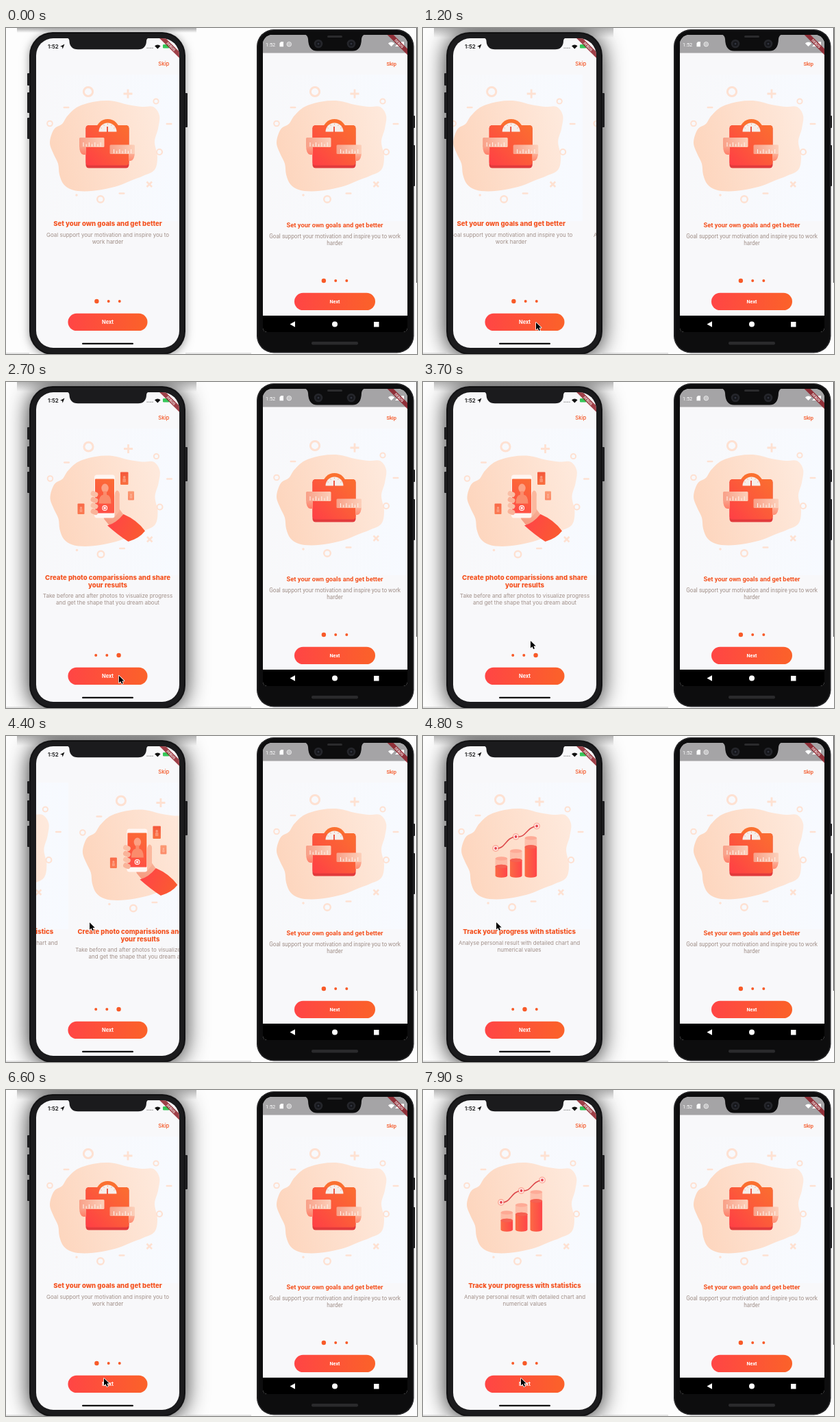
An HTML page with a canvas that plays this animation: 600x476 px, repeating every 8 s.

```html
<!DOCTYPE html>
<html lang="en">
<head>
<meta charset="utf-8">
<title>Onboarding on two phones</title>
<style>
html, body { margin: 0; width: 100%; height: 100%; overflow: hidden; background: #fdfdfd; }
canvas { display: block; width: 600px; height: 476px; }
</style>
</head>
<body>
<canvas id="stage"></canvas>
<script>
const W = 600, H = 476, LOOP = 8000, PAGE = 209;
const canvas = document.getElementById('stage');
const ctx = canvas.getContext('2d');
const dpr = window.devicePixelRatio || 1;
canvas.width = W * dpr;
canvas.height = H * dpr;

const IOS = 'Inter, "Open Sans", sans-serif';
const DROID = 'Roboto, "Noto Sans", sans-serif';
const ORANGE = '#f4511e', GREY = '#a08f88', DECO = '#fee1d2';

const PAGES = [
  { title: ['Set your own goals and get better'],
    body: ['Goal support your motivation and inspire you to', 'work harder'], art: drawScale },
  { title: ['Track your progress with statistics'],
    body: ['Analyse personal result with detailed chart and', 'numerical values'], art: drawChart },
  { title: ['Create photo comparissions and share', 'your results'],
    body: ['Take before and after photos to visualize progress', 'and get the shape that you dream about'],
    art: drawHand, dx: 0.5, dy: 1.5 }
];

// ---- motion ----
function bezier(x1, y1, x2, y2) {
  const f = (a, b, u) => 3 * a * u * (1 - u) ** 2 + 3 * b * u * u * (1 - u) + u ** 3;
  return x => {
    let lo = 0, hi = 1;
    for (let i = 0; i < 24; i++) {
      const mid = (lo + hi) / 2;
      if (f(x1, x2, mid) < x) lo = mid; else hi = mid;
    }
    return f(y1, y2, (lo + hi) / 2);
  };
}
const ease = bezier(0.25, 0.1, 0.25, 1);
const easeInOut = x => x * x * (3 - 2 * x);
const cubicOut = x => 1 - (1 - x) ** 3;
const clamp = x => Math.min(1, Math.max(0, x));

// start, end, page to reach, curve
const SLIDES = [
  [1150, 1650, 1, ease],
  [2070, 2570, 2, ease],
  [4250, 4500, 1.65, easeInOut],
  [4500, 4990, 1, cubicOut],
  [5150, 5450, 0.65, easeInOut],
  [5450, 5940, 0, cubicOut],
  [7000, 7500, 1, ease]
];
function pagePos(t) {
  let pos = 0;
  for (const [a, b, to, curve] of SLIDES) {
    if (t > a) pos += (to - pos) * curve(clamp((t - a) / (b - a)));
  }
  return pos;
}

// time, x, y
const POINTER = [
  [250, 300, 480], [700, 165, 430], [2650, 165, 430], [3200, 157, 378], [3750, 157, 378],
  [4200, 78, 274], [4250, 78, 273], [4500, 146, 272], [4800, 107, 272], [5120, 80, 273],
  [5150, 80, 273], [5450, 148, 275], [5650, 148, 280], [6250, 143, 421], [8000, 143, 421]
];
function pointerAt(t) {
  for (let i = 1; i < POINTER.length; i++) {
    const [t0, x0, y0] = POINTER[i - 1], [t1, x1, y1] = POINTER[i];
    if (t >= t0 && t <= t1) {
      const k = easeInOut((t - t0) / (t1 - t0));
      return [x0 + (x1 - x0) * k, y0 + (y1 - y0) * k];
    }
  }
  return null;
}

// ---- drawing helpers ----
function rr(x, y, w, h, r, fill) {
  ctx.beginPath();
  ctx.roundRect(x, y, w, h, r);
  if (fill) { ctx.fillStyle = fill; ctx.fill(); }
}
function disc(x, y, r, fill) {
  ctx.beginPath();
  ctx.arc(x, y, r, 0, Math.PI * 2);
  ctx.fillStyle = fill;
  ctx.fill();
}
function ring(x, y, r, lw, color) {
  ctx.beginPath();
  ctx.arc(x, y, r, 0, Math.PI * 2);
  ctx.lineWidth = lw;
  ctx.strokeStyle = color;
  ctx.stroke();
}
function line(x0, y0, x1, y1, lw, color) {
  ctx.beginPath();
  ctx.moveTo(x0, y0);
  ctx.lineTo(x1, y1);
  ctx.lineWidth = lw;
  ctx.strokeStyle = color;
  ctx.stroke();
}
function shape(d, fill) {
  ctx.fillStyle = fill;
  ctx.fill(new Path2D(d));
}
function grad(x0, y0, x1, y1, ...colors) {
  const g = ctx.createLinearGradient(x0, y0, x1, y1);
  colors.forEach((c, i) => g.addColorStop(i / (colors.length - 1), c));
  return g;
}
function text(s, x, y, font, color, align = 'center') {
  ctx.font = font;
  ctx.fillStyle = color;
  ctx.textAlign = align;
  ctx.fillText(s, x, y);
}

// ---- illustrations ----
const BLOB = [
  [64, 167], [70, 148], [82, 140], [90, 128], [105, 115], [130, 107.5], [155, 106.5], [178, 112],
  [198, 115], [215, 115], [224, 128], [222, 147], [217, 166], [221, 188], [217, 207], [200, 216],
  [182, 223], [165, 230], [140, 236], [115, 238.5], [96, 236], [84, 228], [78, 214], [76, 198], [69, 183]
];
function drawBlob() {
  const n = BLOB.length, at = i => BLOB[(i + n) % n];
  ctx.beginPath();
  ctx.moveTo(...BLOB[0]);
  for (let i = 0; i < n; i++) {
    const a = at(i - 1), b = at(i), c = at(i + 1), d = at(i + 2);
    ctx.bezierCurveTo(b[0] + (c[0] - a[0]) / 6, b[1] + (c[1] - a[1]) / 6,
      c[0] - (d[0] - b[0]) / 6, c[1] - (d[1] - b[1]) / 6, c[0], c[1]);
  }
  ctx.fillStyle = grad(64, 190, 226, 150, '#fdd5bd', '#fee9dc');
  ctx.fill();
}
function drawDeco() {
  ring(120, 93, 6.6, 3, DECO);
  ring(219, 107, 3.6, 2, DECO);
  ring(64, 139.5, 3.8, 2, DECO);
  ring(224, 181, 4, 2.2, DECO);
  ring(138, 250, 4.8, 2.4, DECO);
  disc(103, 244, 1.8, DECO);
  for (const [x, y] of [[88, 116], [238, 140], [169, 241.5]]) rr(x - 4.5, y - 1.2, 9, 2.4, 1.2, DECO);
  line(171.5, 96, 184.5, 96, 2.8, DECO);
  line(178, 89.5, 178, 102.5, 2.8, DECO);
  line(205.5, 224.5, 213, 232, 2.6, DECO);
  line(213, 224.5, 205.5, 232, 2.6, DECO);
}
function tape(x, y, w, h) {
  rr(x, y, w, h, 1.5, grad(x, 0, x + w, 0, '#f8a088', '#fcd0ba'));
  for (let i = 0; i < 7; i++) {
    const long = i % 2 === 0;
    line(x + 6 + i * 4.2, y + h - 1, x + 6 + i * 4.2, y + h - (long ? 7 : 4.5), 1, '#fff4ee');
  }
}
function drawScale() {
  disc(148.5, 150.5, 17.5, '#fb7030');
  rr(116.5, 142, 63, 62.5, 4.5, '#e23a3c');
  rr(116.5, 142, 63, 58.5, 4.5, grad(118, 200, 180, 142, '#ff3f45', '#fc5a3a', '#fb6f2f'));
  ctx.beginPath();
  ctx.arc(148.5, 151.5, 13, Math.PI, 0);
  ctx.closePath();
  ctx.fillStyle = '#f6eeea';
  ctx.fill();
  for (let i = 1; i < 6; i++) {
    const a = Math.PI * (1 + i / 6), c = Math.cos(a), s = Math.sin(a);
    line(148.5 + c * 10, 151.5 + s * 10, 148.5 + c * 12, 151.5 + s * 12, 0.8, '#f2a58c');
  }
  line(148, 144, 148, 152, 1.8, '#ee4a35');
  // curled tape ends
  shape('M107 171 Q107 184 113 185 L117 185 V174 H111Z', grad(0, 172, 0, 185, '#f9a48c', '#ff7f6a'));
  tape(107, 160, 36.5, 14);
  shape('M188 180 Q188 193 182 194 L179 194 V184 H184Z', grad(0, 181, 0, 194, '#fbb69e', '#ff8d72'));
  tape(151.5, 170.5, 36.5, 13.5);
}
function cylinder(x, top, bottom, side, cap) {
  const rx = 8.8, ry = 2.8;
  ctx.beginPath();
  ctx.ellipse(x, top, rx, ry, 0, Math.PI, 0);
  ctx.lineTo(x + rx, bottom);
  ctx.ellipse(x, bottom, rx, ry, 0, 0, Math.PI);
  ctx.closePath();
  ctx.fillStyle = side;
  ctx.fill();
  ctx.beginPath();
  ctx.ellipse(x, top, rx, ry, 0, 0, Math.PI * 2);
  ctx.fillStyle = cap;
  ctx.fill();
}
function drawChart() {
  for (const [x, ghost, top] of [[122.3, 179, 190.5], [143.7, 168, 181.5], [165.3, 149, 162]]) {
    cylinder(x, top, 204, grad(x - 9, 0, x + 9, 0, '#fb6a45', '#ff4548'), '#f2483f');
    cylinder(x, ghost, top, 'rgba(253,135,110,.38)', 'rgba(252,140,120,.4)');
  }
  ctx.strokeStyle = '#dd4a4c';
  ctx.lineWidth = 1.6;
  ctx.stroke(new Path2D('M114 164 C128 166 128 148 143.5 147 C160 149 157 134 174 131.5'));
  for (const [x, y] of [[114, 164], [143.5, 147], [174, 131.5]]) {
    disc(x, y, 5, 'rgba(250,110,100,.4)');
    disc(x, y, 3.3, '#fff2ee');
    disc(x, y, 1.9, '#e8414b');
  }
}
function snapshot(x, y, w, h, top, low) {
  rr(x, y, w, h, 1, grad(0, y, 0, y + h, top, low));
  disc(x + w / 2, y + h * 0.4, w * 0.16, 'rgba(255,205,185,.5)');
  rr(x + w * 0.3, y + h * 0.52, w * 0.4, h * 0.28, 1, 'rgba(255,205,185,.4)');
}
function drawHand() {
  snapshot(166.5, 130, 11.5, 18.5, '#f4573c', '#f9703f');
  snapshot(177.5, 158, 9, 13, '#fb9a74', '#fc8a68');
  snapshot(104, 176, 10, 15.5, '#f96a48', '#fb7a52');
  // palm and thumb behind the handset
  shape('M140 190 L157 172 Q157 160 161 157 Q166 157 165 166 L165 184 L174 196 L153 211 L143 199Z',
    grad(145, 205, 166, 160, '#f59a80', '#fbc0a6'));
  shape('M147.5 208 Q160 205 171 191.5 Q191 200 202.5 216 Q194 227 178 231.5 Q163 222 147.5 208Z',
    grad(150, 205, 198, 225, '#ff4547', '#fa5b30'));
  rr(128.5, 134, 30, 63, 4, '#fff6f2');
  rr(129.5, 140, 28, 50, 1, grad(130, 188, 157, 140, '#ff4c48', '#fb6d34'));
  ctx.beginPath();
  ctx.ellipse(144, 153.5, 5.2, 6.5, 0, 0, Math.PI * 2);
  ctx.fillStyle = '#fca184';
  ctx.fill();
  shape('M141.5 158 H146.5 V163 Q153 164 153 176 H135 Q135 164 141.5 163Z', '#fb8b6b');
  ring(143.7, 182.5, 3.4, 1.1, '#fff');
  disc(143.7, 182.5, 1.8, '#fff');
  for (let i = 0; i < 4; i++) {
    ctx.save();
    ctx.translate(128, 162 + i * 8.7);
    ctx.rotate(0.42);
    rr(-5, -3.8, 11, 7.4, 3.6, i % 2 ? '#f9b399' : '#fabfa6');
    ctx.restore();
  }
  shape('M158 190 V166 Q158 158 162 157 Q166 158 165 166 V187 L158 196Z', '#fbb89e');
}
function drawArt(page) {
  ctx.fillStyle = grad(44, 0, 253, 0, '#f8f8fa', '#f7faff');
  ctx.fillRect(44, 68, PAGE, 214);
  ctx.save();
  ctx.translate(page.dx || 0, page.dy || 0);
  drawBlob();
  drawDeco();
  page.art();
  ctx.restore();
}

// ---- shared interface parts ----
function drawDots(cx, y, pos) {
  const size = [0, 1, 2].map(i => 4 + 2.4 * easeInOut(clamp((0.5 - Math.abs(pos - i)) / 0.3 + 0.5)));
  const gap = 12.1;
  let x = cx - (size[0] + size[1] + size[2] + 2 * gap) / 2;
  for (const s of size) {
    disc(x + s / 2, y, s / 2, '#f85a28');
    x += s + gap;
  }
}
function drawButton(x, y, w, font) {
  rr(x, y, w, 25.3, 12.6, grad(x, 0, x + w, 0, '#ff4545', '#fb6229'));
  text('Next', x + w / 2, y + 15.2, font, '#fff');
}
function drawBanner(x, y) {
  ctx.save();
  ctx.translate(x, y);
  ctx.rotate(Math.PI / 4);
  ctx.fillStyle = 'rgba(140,24,34,.82)';
  ctx.fillRect(-21, 14, 42, 6.4);
  text('DEBUG', 0, 19, '700 5px ' + DROID, '#f6e9e9');
  ctx.restore();
}
function wifi(x, y, r, color) {
  ctx.beginPath();
  ctx.moveTo(x, y);
  ctx.arc(x, y, r, -Math.PI * 0.75, -Math.PI * 0.25);
  ctx.closePath();
  ctx.fillStyle = color;
  ctx.fill();
}

// ---- left phone ----
function drawLeft(pos, focused) {
  ctx.fillStyle = focused ? grad(0, 0, 0, 14, 'rgba(30,30,30,.3)', 'rgba(30,30,30,0)')
    : grad(0, 0, 0, 7, 'rgba(40,40,40,.38)', 'rgba(40,40,40,0)');
  ctx.fillRect(16, 0, 262, 14);
  ctx.save();
  ctx.shadowColor = focused ? 'rgba(0,0,0,.85)' : 'rgba(0,0,0,.4)';
  ctx.shadowBlur = (focused ? 32 : 13) * dpr;
  ctx.shadowOffsetY = 2 * dpr;
  rr(34, 6, 228, 471, 34, '#1b1b1d');
  ctx.restore();
  for (const [x, y, h] of [[31, 66, 18], [31, 94, 30], [31, 131, 31], [261, 95, 50]]) rr(x, y, 4, h, 1, '#1d1d1f');
  rr(35.5, 7.5, 225, 468, 32.5);
  ctx.lineWidth = 1;
  ctx.strokeStyle = '#0c0c0d';
  ctx.stroke();

  ctx.save();
  rr(44, 15, PAGE, 452, 25, '#f8f8fa');
  ctx.clip();
  PAGES.forEach((page, i) => {
    const shift = (i - pos) * PAGE;
    if (Math.abs(shift) >= PAGE) return;
    ctx.save();
    ctx.translate(shift, 0);
    drawArt(page);
    page.title.forEach((s, k) => text(s, 148.5, 289.3 + k * 10.4, '800 9.6px ' + IOS, ORANGE));
    const base = 304.8 + (page.title.length - 1) * 10.6;
    page.body.forEach((s, k) => text(s, 148.5, base + k * 9.7, '400 8px ' + IOS, GREY));
    ctx.restore();
  });
  text('Skip', 230.3, 55.4, '500 7.7px ' + IOS, ORANGE);
  drawDots(148.5, 399, pos);
  drawButton(90.5, 416.8, 116, '700 7.4px ' + IOS);

  text('1:52', 61, 30, '600 8px ' + IOS, '#111', 'left');
  shape('M85.5 23.5 L79 27 L82 27.6 L82.6 30.8Z', '#111');
  for (let i = 0; i < 4; i++) disc(206.2 + i * 2.6, 29.3, 0.7, '#777');
  wifi(221.3, 30.5, 6, '#111');
  rr(229, 24, 9.5, 5.5, 1.3, '#35c759');
  drawBanner(253, 15);
  rr(111, 459.8, 75, 2.2, 1.1, '#111');
  ctx.restore();

  shape('M88 14 Q92.5 15 92.5 19 Q93 31 105 31.3 H193 Q204.500 31 205 19 Q205 15 209.500 14Z', '#1b1b1d');
}

// ---- right phone ----
function drawRight() {
  for (const [y, h] of [[128, 18], [171, 60]]) rr(593, y, 4, h, 1, '#1a1a1a');
  rr(366, 2, 229.500, 472.500, 25, '#0d0d0e');
  rr(367, 3, 227.500, 470.500, 24);
  ctx.lineWidth = 1;
  ctx.strokeStyle = '#303033';
  ctx.stroke();

  ctx.save();
  rr(375, 10, 211, 434, [14, 14, 6, 6], '#f8f8fa');
  ctx.clip();
  ctx.fillStyle = '#a5a4a6';
  ctx.fillRect(375, 10, 211, 26.5);
  ctx.save();
  ctx.translate(331, 0);
  drawArt(PAGES[0]);
  ctx.restore();
  text('Skip', 562.700, 54.600, '500 7.5px ' + DROID, ORANGE);
  text(PAGES[0].title[0], 480, 291, '700 9.35px ' + DROID, ORANGE);
  text('Goal support your motivation and inspire you to work', 480, 307, '400 8.2px ' + DROID, GREY);
  text('harder', 480, 316.800, '400 8.2px ' + DROID, GREY);
  drawDots(480, 369, 0);
  drawButton(421, 386.800, 118, '700 7.2px ' + DROID);

  text('1:52', 379, 26.600, '400 7.4px ' + DROID, '#fff', 'left');
  shape('M399.500 22 L401.500 20 H405 V27.300 H399.500Z', '#fff');
  ring(413.300, 23.700, 3.2, 0.9, '#fff');
  ring(413.300, 23.700, 1.4, 0.8, '#fff');
  wifi(562.500, 27, 6.5, '#fff');
  shape('M568 27 L575 20 V27Z', '#fff');
  rr(577, 20, 4, 7.200, 0.8, '#fff');
  drawBanner(586, 10.500);

  ctx.fillStyle = '#000';
  ctx.fillRect(375, 420, 211, 24);
  shape('M414.500 432.500 L422 428.300 V436.700Z', '#fff');
  disc(480, 432.500, 4, '#fff');
  ctx.fillStyle = '#fff';
  ctx.fillRect(537, 429, 7.500, 7.500);
  ctx.restore();

  shape('M436 9 Q440.500 11 441 16 Q441.500 33.500 454 33.500 H506 Q518.500 33.500 519 16 Q519.500 11 524 9Z', '#0d0d0e');
  for (const x of [456, 504]) {
    disc(x, 23, 6.3, '#25262b');
    disc(x, 23, 3.6, '#15161a');
    disc(x, 23, 1.5, '#30333f');
  }
  rr(469, 11, 22, 3, 1.5, '#2b2b2d');
  rr(446, 458, 68, 4.500, 2, '#2a2a2c');
}

function drawPointer(p) {
  if (!p) return;
  ctx.save();
  ctx.translate(p[0], p[1]);
  const arrow = new Path2D('M0 0 V10.500 L2.500 8.300 L4.200 12 L6 11.200 L4.400 7.600 H7.700Z');
  ctx.lineJoin = 'round';
  ctx.lineWidth = 1.6;
  ctx.strokeStyle = '#fff';
  ctx.stroke(arrow);
  ctx.fillStyle = '#000';
  ctx.fill(arrow);
  ctx.restore();
}

function draw(t) {
  ctx.setTransform(dpr, 0, 0, dpr, 0, 0);
  ctx.fillStyle = '#fdfdfd';
  ctx.fillRect(0, 0, W, H);
  drawLeft(pagePos(t), t >= 600);
  drawRight();
  ctx.fillStyle = '#c9c9c9';
  ctx.fillRect(0, 474.500, 34, 1);
  ctx.fillRect(262, 474.500, 96, 1);
  ctx.fillStyle = '#555';
  ctx.fillRect(599, 0, 1, 372);
  drawPointer(pointerAt(t));
}

let start = null;
function tick(now) {
  if (start === null) start = now;
  draw((now - start) % LOOP);
  requestAnimationFrame(tick);
}
requestAnimationFrame(tick);
</script>
</body>
</html>
```
